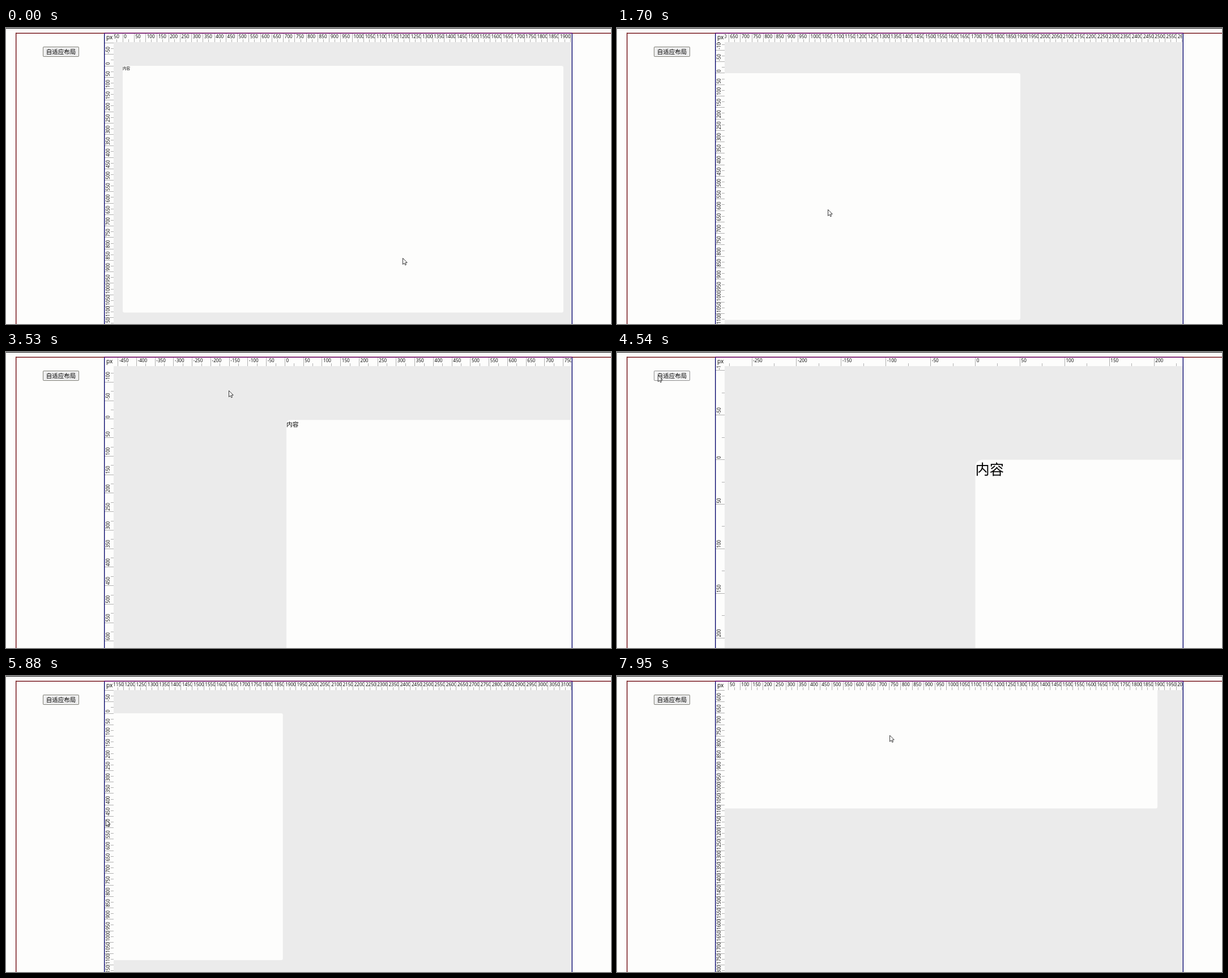
Animation, 1068 px wide and 524 px high, one loop 7.99 s. Source, as an HTML page with a canvas:

```html
<!DOCTYPE html>
<html lang="zh">
<head>
<meta charset="utf-8">
<style>
html, body { margin: 0; width: 100%; height: 100%; overflow: hidden; background: #fdfdfc; }
canvas { display: block; }
</style>
</head>
<body>
<canvas id="stage" width="1068" height="524"></canvas>
<script>
const ctx = document.getElementById('stage').getContext('2d');
const W = 1068, H = 524, LOOP = 7990;
const HOME = { x: 206, y: 67, s: 0.4052 };
const RULER = { left: 174, top: 10, x: 190, y: 25, right: 998, lag: 12 };
const PAPER = '#fdfdfc';
const CJK = '"Noto Sans CJK SC", "Noto Sans CJK", sans-serif';
const LATIN = '"Open Sans", "Noto Sans", sans-serif';

// Places where the pointer rests; it eases from one to the next
const stop = (at, x, y, until = at) => ({ at, x, y, until });
const stops = [
  stop(0, 700, 407),
  stop(840, 644, 308),
  stop(1700, 372, 321),
  stop(2390, 892.5, 340.5, 2450),
  stop(3260, 393, 68, 3950),
  stop(4420, 72, 41, 4640),
  stop(5380, 671, 255),
  stop(6000, 123, 254),
  stop(6400, 450, 300, 6450),
  stop(6900, 96, 40, 7150),
  stop(7560, 511, 374),
  stop(8000, 480, 95)
];

// Each drag moves the view until the button resets it
const drags = [
  { grab: 840, release: 2390, reset: 4620 },
  { grab: 5380, release: 6400, reset: 7010 },
  { grab: 7560, release: LOOP, reset: LOOP }
];
const zoom = { start: 3300, end: 3920, factor: 3.894 };
const PRESS = 110;

const clamp = v => Math.min(1, Math.max(0, v));
const ease = u => u * u * (3 - 2 * u);

function pointerAt(t) {
  const i = Math.max(1, stops.findIndex(s => s.at > t));
  const a = stops[i - 1], b = stops[i];
  const u = ease(clamp((t - a.until) / (b.at - a.until)));
  return { x: a.x + (b.x - a.x) * u, y: a.y + (b.y - a.y) * u };
}

function viewAt(t) {
  const drag = drags.find(d => t >= d.grab && t < d.reset);
  if (!drag) return HOME;
  const from = pointerAt(drag.grab);
  const to = pointerAt(Math.min(t, drag.release));
  const x = HOME.x + to.x - from.x, y = HOME.y + to.y - from.y;
  if (t < zoom.start || t >= drags[0].reset) return { x, y, s: HOME.s };

  // The wheel scales about the resting pointer
  const k = zoom.factor ** clamp((t - zoom.start) / (zoom.end - zoom.start));
  const pivot = pointerAt(zoom.start);
  return { x: pivot.x + (x - pivot.x) * k, y: pivot.y + (y - pivot.y) * k, s: HOME.s * k };
}

function rect(x, y, w, h, color) {
  ctx.fillStyle = color;
  ctx.fillRect(x, y, w, h);
}

function rounded(x, y, w, h, r, color) {
  ctx.beginPath();
  ctx.roundRect(x, y, w, h, r);
  ctx.fillStyle = color;
  ctx.fill();
}

function text(str, x, y, size, family) {
  ctx.font = `${size}px ${family}`;
  ctx.fillStyle = '#000';
  ctx.fillText(str, x, y);
}

function clipped(x, y, w, h, draw) {
  ctx.save();
  ctx.beginPath();
  ctx.rect(x, y, w, h);
  ctx.clip();
  draw();
  ctx.restore();
}

function eachTick(origin, scale, from, to, draw) {
  const step = 25 * scale;
  const last = Math.ceil((to - origin) / step) + 2;
  for (let i = Math.floor((from - origin) / step) - 2; i <= last; i++) {
    draw(origin + i * step, i % 2 === 0, String(i * 25));
  }
}

function drawRulers({ x, y, s }) {
  const { left, top, right } = RULER, tick = '#b0b0b0', size = 8.1;
  rect(left, top, right - left, RULER.y - top, PAPER);
  rect(left, top, RULER.x - left, H - top, PAPER);
  clipped(RULER.x, top, right - RULER.x, RULER.y - top, () => {
    eachTick(x, s, RULER.x, right, (pos, major, label) => {
      const length = major ? 15 : 5;
      rect(Math.floor(pos), RULER.y - length, 1, length, tick);
      if (major) text(label, pos + 2.2, 18, size, LATIN);
    });
  });
  clipped(left, RULER.y, RULER.x - left, H - RULER.y, () => {
    eachTick(y, s, RULER.y, H, (pos, major, label) => {
      const length = major ? 16 : 5;
      rect(RULER.x - length, Math.floor(pos), length, 1, tick);
      if (!major) return;
      ctx.save();
      ctx.translate(183.3, pos - 1.7);
      ctx.rotate(-Math.PI / 2);
      text(label, 0, 0, size, LATIN);
      ctx.restore();
    });
  });
  text('px', 177, 19.5, 10, LATIN);
}

function drawCanvasArea({ x, y, s }) {
  const w = RULER.right - RULER.x, h = H - RULER.y;
  clipped(RULER.x, RULER.y, w, h, () => {
    rect(RULER.x, RULER.y, w, h, '#ebebeb');
    rounded(x, y, 1920 * s, 1078 * s, 8 * s, PAPER);
    text('内容', x, y + 16.8 * s, 16 * s, CJK);
  });
}

function drawFrame() {
  const maroon = '#6e0a10', navy = '#08086e', line = 1.4;
  rect(0, 0, W, 1, '#111');
  rect(17, 8.6, W - 17, line, maroon);
  rect(17, 8.6, line, H, maroon);
  rect(173, 8.6, 827, line, '#6e0a6e');
  rect(173, 10, line, H, navy);
  rect(998.6, 10, line, H, navy);
}

function drawButton(t, pointer) {
  const x = 65, y = 33, w = 64, h = 18;
  const pressed = drags.some(d => t < d.reset && t >= d.reset - PRESS && d.reset < LOOP);
  const hover = pointer.x >= x && pointer.x < x + w && pointer.y >= y && pointer.y < y + h;
  rounded(x, y, w, h, 2, pressed ? '#909090' : hover ? '#666' : '#808078');
  rounded(x + 1, y + 1, w - 2, h - 2, 1, pressed ? '#f5f5f5' : hover ? '#e4e4e4' : '#eee');
  text('自适应布局', 70.7, 46.3, 10.5, CJK);
}

function drawPointer({ x, y }) {
  const arrow = [[0, 0], [0, 11], [2.6, 8.7], [4.3, 12.3], [6, 11.5], [4.4, 8], [7.7, 7.8]];
  ctx.beginPath();
  arrow.forEach(([dx, dy]) => ctx.lineTo(x + 0.5 + dx, y + 0.5 + dy));
  ctx.closePath();
  ctx.fillStyle = '#fff';
  ctx.fill();
  ctx.strokeStyle = '#222';
  ctx.lineWidth = 0.9;
  ctx.stroke();
}

function render(t) {
  const pointer = pointerAt(t);
  rect(0, 0, W, H, PAPER);
  drawCanvasArea(viewAt(t));
  drawRulers(viewAt(t - RULER.lag));
  drawFrame();
  drawButton(t, pointer);
  drawPointer(pointer);
}

const start = performance.now();
function loop() {
  render((performance.now() - start) % LOOP);
  requestAnimationFrame(loop);
}
loop();
</script>
</body>
</html>
```
